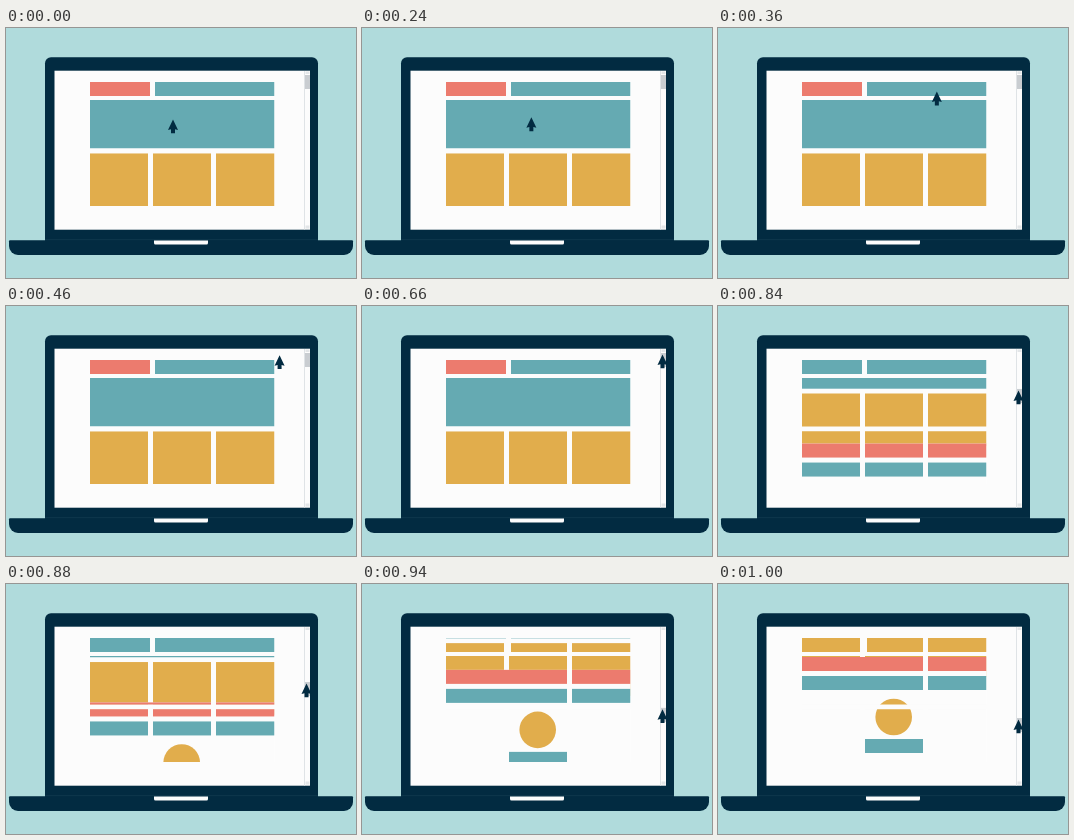
An HTML page with a canvas for the animation above (1.82 s loop, 350 by 250 pixels).

```html
<!DOCTYPE html>
<html lang="en">
<head>
<meta charset="utf-8">
<title>Laptop page scroll</title>
<style>
html, body { margin: 0; width: 100%; height: 100%; overflow: hidden; background: #b0dbdc; }
canvas { display: block; width: 350px; height: 250px; }
</style>
</head>
<body>
<canvas id="stage" width="350" height="250"></canvas>
<script>
const ctx = document.getElementById('stage').getContext('2d');
const LOOP = 1820;
const SKY = '#b0dbdc', NAVY = '#022b41', PAPER = '#fcfcfc';
const TEAL = '#65aab2', RED = '#ec7b6e', GOLD = '#e1ad4c';
const COLUMNS = [[84, 142], [147, 205], [210, 268.5]];

// Visible windows of the page: x0, y0, x1, y1
const panes = [
  [84, 54, 144, 68],
  [149, 54, 268.5, 68],
  [84, 72, 268.5, 120.5],
  ...COLUMNS.map(([a, b]) => [a, 125.3, b, 178])
];

const clamp = v => Math.max(0, Math.min(1, v));
const span = (v, a, b) => clamp((v - a) / (b - a));
const ease = v => Math.sin(v * Math.PI / 2) ** 2;
const mix = (a, b, k) => a + (b - a) * k;

function box(color, x0, y0, x1, y1) {
  ctx.fillStyle = color;
  ctx.fillRect(x0, y0, x1 - x0, y1 - y0);
}

function round(color, x, y, w, h, radii) {
  ctx.fillStyle = color;
  ctx.beginPath();
  ctx.roundRect(x, y, w, h, radii);
  ctx.fill();
}

function drawLaptop() {
  box(SKY, 0, 0, 350, 250);
  round(NAVY, 39, 29.3, 273, 184, [6, 6, 0, 0]);
  box(PAPER, 48.5, 42.7, 304, 201.7);
  box('#1c4459', 39, 211.6, 312, 212.2);
  round(NAVY, 3, 212.2, 344, 14.8, [1, 1, 9, 9]);
  round(PAPER, 148, 212.6, 54, 3.8, [0, 0, 1.5, 1.5]);
}

function drawScrollbar(shift) {
  box('#dfe3e6', 298, 43, 299, 201.5);
  box('#e3e6e8', 299.5, 43.5, 303.5, 46);
  box('#e3e6e8', 299.5, 197.5, 303.5, 200.5);
  box('#c9cdd1', 299, 47 + shift, 304, 61 + shift);
}

function drawUpper(y) {
  box(RED, 84, 54 - y, 144, 68 - y);
  box(TEAL, 149, 54 - y, 268.5, 68 - y);
  box(TEAL, 84, 72 - y, 268.5, 120.5 - y);
  for (const [a, b] of COLUMNS) box(GOLD, a, 125.3 - y, b, 178 - y);
}

function drawLower(y) {
  box(PAPER, 84, y, 269, y + 130);
  for (const [color, top] of [[RED, y], [TEAL, y + 19]]) {
    box(color, 84, top, 205, top + 14);
    box(color, 210, top, 268.5, top + 14);
  }
  ctx.fillStyle = GOLD;
  ctx.beginPath();
  ctx.arc(175.7, y + 60, 18.3, 0, Math.PI * 2);
  ctx.fill();
  box(TEAL, 147, y + 82, 205, y + 96);
}

function drawPage(step, scroll) {
  ctx.save();
  ctx.beginPath();
  for (const [x0, y0, x1, y1] of panes) ctx.rect(x0, y0, x1 - x0, y1 - y0);
  ctx.clip();
  drawUpper(9.45 * Math.max(0, step - 24));
  drawLower(183 - 110 * scroll);
  ctx.restore();
}

// Swing past the scrollbar, settle on it, then drag it down
function cursorAt(step, scroll) {
  const p = ease(span(step, 7, 19.4));
  const back = ease(span(step, 19.4, 22));
  const rise = p + 2.14 * p * (1 - p) * (0.45 - p);
  return [
    mix(167 + 148 * p, 300.5, back),
    mix(92 - 70 * rise, 49, back) + 87 * scroll
  ];
}

function drawCursor([x, y]) {
  ctx.fillStyle = NAVY;
  ctx.beginPath();
  ctx.moveTo(x, y - 0.5);
  for (const [dx, dy] of [[5, 10], [2, 9.2], [2, 13.3], [-2, 13.3], [-2, 9.2], [-5, 10]]) {
    ctx.lineTo(x + dx, y + dy);
  }
  ctx.fill();
}

function draw(ms) {
  // 30 ms steps shown on a 20 ms clock
  const step = Math.min(33, Math.floor(Math.floor(ms / 20) * 20 / 30));
  const scroll = ease(span(step, 24, 33));
  drawLaptop();
  drawScrollbar(87 * scroll);
  drawPage(step, scroll);
  drawCursor(cursorAt(step, scroll));
}

const start = performance.now();
function tick() {
  draw((performance.now() - start) % LOOP);
  requestAnimationFrame(tick);
}
tick();
</script>
</body>
</html>
```
